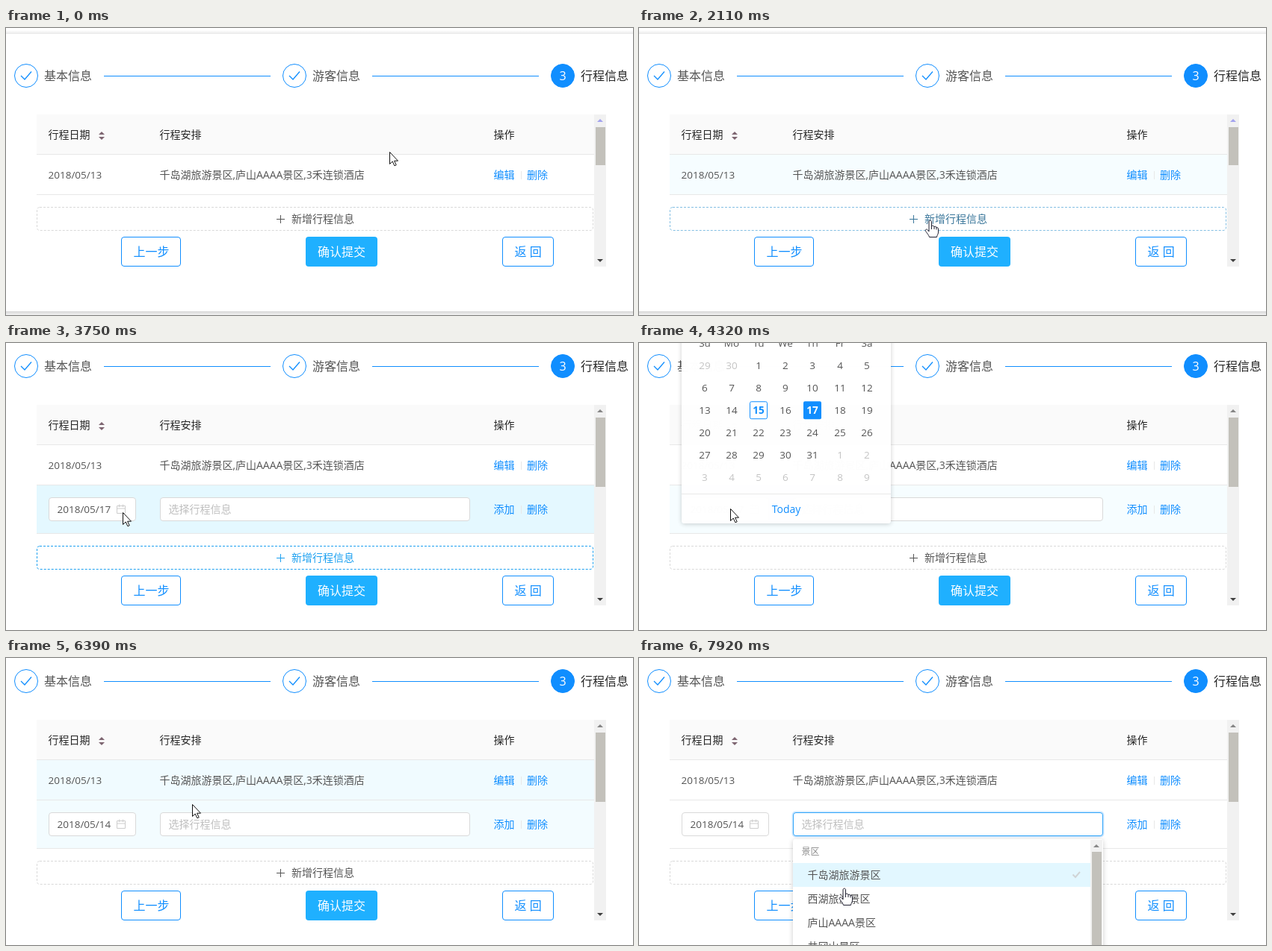
Write an HTML page that moves like this. It is 839x385 px and loops after 8000 ms.

```html
<!DOCTYPE html>
<html lang="zh-CN">
<head>
<meta charset="utf-8">
<title>行程信息</title>
<style>
html, body { margin: 0; width: 100%; height: 100%; overflow: hidden; background: #fff; }
svg { display: block; width: 839px; height: 385px; }
text { font-family: 'Open Sans', 'Noto Sans CJK SC', 'Noto Sans CJK', 'Noto Sans', sans-serif; white-space: pre; }
</style>
</head>
<body>
<svg id="stage" viewBox="0 0 839 385" xmlns="http://www.w3.org/2000/svg"></svg>
<script>
const LOOP = 8000, STEP = 110;
const ADDED = 2640, OPENED = 4100, PICKED = 5280, SELECTING = 7030;
const BLUE = '#108eff', GREY = '#d9d9d9', TEXT = '#555', DARK = '#262626', TINT = '#e4f8ff';

const rect = (x, y, w, h, fill, more = '') =>
  `<rect x="${x}" y="${y}" width="${w}" height="${h}" fill="${fill}" ${more}/>`;
const text = (x, y, s, fill = TEXT, size = 14, more = '') =>
  `<text x="${x}" y="${y}" style="fill:${fill};font-size:${size}px" ${more}>${s}</text>`;
const path = (d, fill, more = '') => `<path d="${d}" fill="${fill}" ${more}/>`;
const line = (d, color, more = '') => path(d, 'none', `stroke="${color}" ${more}`);
const rule = (y, x = 41, w = 746) => line(`M${x} ${y}.5h${w}`, '#e8e8e8');
const group = (id, body) => `<g id="${id}">${body}</g>`;
const box = (x, y, w, h, color, more = '') =>
  rect(x + .5, y + .5, w - 1, h - 1, '#fff', `rx="3.5" stroke="${color}" ${more}`);
const arrowUp = (x, y, fill, more) => path(`M${x - 4} ${y + 2}l4 -4l4 4z`, fill, more);
const arrowDown = (x, y, fill, more) => path(`M${x - 4} ${y - 2}l4 4l4 -4z`, fill, more);
const middle = 'text-anchor="middle"';

function steps() {
  return ['基本信息', '游客信息', '行程信息'].map((name, i) => {
    const x = 27 + 359 * i, last = i === 2;
    return `<circle cx="${x}" cy="64" r="15.5" fill="${last ? BLUE : '#fff'}" stroke="${BLUE}"/>` +
      (last ? text(x, 69.5, '3', '#fff', 16, middle)
            : line(`M${x - 7} 64l5 5l9 -10.5`, BLUE, 'stroke-width="1.3"') + line(`M${x + 104} 64.5h223`, BLUE)) +
      text(x + 24, 70, name, last ? DARK : TEXT, 16);
  }).join('');
}

function actions(y, first) {
  return text(652.5, y, first, BLUE) + line(`M689.5 ${y - 10}v11`, '#e8e8e8') + text(697, y, '删除', BLUE);
}

function table() {
  return rect(41, 116, 746, 53, '#fafafa') + rule(169) +
    text(56.5, 148, '行程日期', DARK) + text(205.5, 148, '行程安排', DARK) + text(652.5, 148, '操作', DARK) +
    arrowUp(128, 141, '#7d6570') + arrowDown(128, 148, '#7d6570') +
    rect(41, 170, 746, 53, TINT, 'id="hover1"') + rule(223) +
    text(56.5, 202, '2018/05/13', TEXT, 13.5) +
    text(205.5, 202, '千岛湖旅游景区,庐山AAAA景区,3禾连锁酒店') + actions(202, '编辑');
}

function newRow() {
  return rect(41, 191, 746, 64, TINT, 'id="hover2"') + rule(255) +
    box(57, 207, 117, 32, GREY) + text(68.5, 228, '', TEXT, 13.5, 'id="date"') +
    line('M148.5 218.5h11v10h-11zM148.5 222h11M151.5 216.5v3.5M156.5 216.5v3.5', '#ccc') +
    rect(204.5, 205.5, 418, 35, BLUE, 'rx="5" id="glow"') +
    box(206, 207, 415, 32, GREY, 'id="select"') +
    text(217.5, 228, '选择行程信息', '#bfbfbf') + actions(228, '添加');
}

function footer() {
  return box(41, 240, 745, 32, GREY, 'id="addBox" stroke-dasharray="3 2"') +
    group('addText', line('M362 256.5h11M367.5 251v11', 'currentColor') +
      text(382, 261, '新增行程信息', 'currentColor')) +
    box(154, 280, 80, 40, BLUE) + text(170.5, 306, '上一步', BLUE, 16) +
    rect(401, 280, 96, 40, '#1fb0ff', 'rx="4"') + text(417, 306, '确认提交', '#fff', 16) +
    box(664, 280, 69, 40, BLUE) + text(680.5, 306, '返 回', BLUE, 16);
}

function calendar() {
  const colX = c => Math.round(88 + 36.1 * c);
  let s = rect(57, -110, 280, 352, '#fff', 'rx="4" filter="url(#shadow)"') +
    rule(202, 57, 280) + text(197, 227.5, 'Today', BLUE, 14, middle);
  'Su Mo Tu We Th Fr Sa'.split(' ').forEach((d, c) => s += text(colX(c), 5, d, TEXT, 13.5, middle));
  for (let i = 0; i < 42; i++) {
    const n = i - 1, x = colX(i % 7), y = 30 + 30 * Math.floor(i / 7);
    const inside = n > 0 && n < 32, today = n === 15;
    const day = n < 1 ? n + 30 : n > 31 ? n - 31 : n;
    s += rect(x - 12, y - 12, 24, 24, 'none', `rx="2" id="cell${n}"`);
    if (today) s += rect(x - 11.5, y - 11.5, 23, 23, '#fff', `rx="2" stroke="${BLUE}"`);
    s += text(x, y + 4.5, day, today ? BLUE : inside ? TEXT : '#c4c4c4', 13.5,
      `${middle} id="day${n}"` + (today ? ' font-weight="700"' : ''));
  }
  return s;
}

function dropdown() {
  return rect(206, 243, 415, 260, '#fff', 'rx="4" filter="url(#shadow)"') +
    text(217.5, 263.5, '景区', '#8c8c8c', 12) + rect(206, 275, 398, 32, '#e2f7ff') +
    ['千岛湖旅游景区', '西湖旅游景区', '庐山AAAA景区', '井冈山景区']
      .map((s, i) => text(225.5, 296 + 32 * i, s)).join('') +
    line('M580.5 290.5l3.5 3.5l6 -7', '#d0d4d6', 'stroke-width="2"') +
    rect(604, 244, 16, 160, '#f1f1f1') + rect(606, 260, 13, 150, '#c3c1bb') + arrowUp(612, 252, '#888');
}

function scrollbar() {
  return rect(787, 0, 16, 0, '#f1f1f1', 'id="track"') + rect(789, 0, 13, 0, '#c3c1bb', 'id="thumb"') +
    arrowUp(795, 8, '#a3a3ee', 'id="up"') + arrowDown(795, -8, '#404040', 'id="down"');
}

const fade = (id, from, to) => `<linearGradient id="${id}" x2="0" y2="1">
  <stop offset="0" stop-color="${from}"/><stop offset="1" stop-color="${to}"/></linearGradient>`;

const stage = document.getElementById('stage');
stage.innerHTML = `<defs>${fade('above', '#fff', '#e9e9e9')}${fade('below', '#d6d6d6', '#f3f3f3')}
  <filter id="shadow" x="-10%" y="-10%" width="120%" height="120%">
    <feDropShadow dx="0" dy="1" stdDeviation="3" flood-opacity=".2"/></filter></defs>` +
  group('page', rect(0, 3, 839, 5, 'url(#above)') + rect(0, 380, 839, 5, 'url(#below)')) +
  group('upper', steps() + table()) + group('row2', newRow()) + group('lower', footer()) +
  scrollbar() + group('cal', calendar()) + group('drop', dropdown()) +
  path('M.5 .5V16.5L4.2 13L6.9 18.8L9.2 17.8L6.6 12.2H11.5Z', '#fff', 'id="arrow" stroke="#111"') +
  path('M-2 2C-2 -.5 1.5 -.5 1.5 2V8C2 6.5 5 6.8 5 9C6 7.5 8 8 8 10C9 9 10.5 9.5 10.5 12V16C10.5 19 8.5 20 8.5 22.5' +
    'H-1.5C-2 20 -4.5 17.5 -6.5 14.5C-7.5 12.5 -5 11 -3.5 13L-2 15ZM1.5 8V12M5 9V12M8 10V12.5',
    '#fff', 'id="hand" stroke="#223" stroke-linejoin="round"');

const el = {};
stage.querySelectorAll('[id]').forEach(n => el[n.id] = n);
const set = (id, attrs) => { for (const k in attrs) el[id].setAttribute(k, attrs[k]); };
const show = (id, on) => set(id, { visibility: on ? 'visible' : 'hidden' });

const ease = k => { k = Math.max(0, Math.min(1, k)); return k * k * (3 - 2 * k); };
const mix = (a, b, k) => `rgb(${a.map((v, i) => Math.round(v + (b[i] - v) * k))})`;

// pointer legs: start, end, then where it comes to rest
const legs = [
  [0, 220, 498, 180], [600, 1310, 212, 309], [1320, 1430, 203, 249], [1430, 1750, 300, 196],
  [1750, 2090, 390, 258], [2970, 3960, 122, 222], [4350, 5060, 124, 92], [5500, 6380, 249, 196],
  [6380, 6930, 280, 222], [7250, 7810, 275, 287], [7810, 7920, 275, 309]
];

function pointer(t) {
  let x = 513, y = 166;
  for (const [from, to, toX, toY] of legs) {
    const k = ease((t - from) / (to - from));
    x += (toX - x) * k;
    y += (toY - y) * k;
  }
  return { x: Math.round(x), y: Math.round(y), t };
}

const covered = p => (p.t > OPENED && p.t < PICKED + 200) || (p.t > SELECTING && p.y >= 243);
const within = (a, b) => p => p.y >= a && p.y < b && !covered(p);
const onRow1 = p => p.t < ADDED ? within(170, 223)(p) : within(137, 190)(p);
const onRow2 = p => p.t >= ADDED && within(191, 255)(p);
const onAdd = p => p.t < ADDED ? within(240, 272)(p) : p.t < OPENED - 300;
const onHand = p => p.t < ADDED ? p.y >= 240 : covered(p) && p.y < 192 || p.t > SELECTING && covered(p);

// share of the last 300 ms spent over an area, like a linear hover transition
function hover(test, t) {
  const N = 20;
  let sum = 0;
  for (let i = 0; i < N; i++) sum += test(pointer(t - 300 * i / N));
  return sum / N;
}

// unfold a popup vertically from a fixed edge
function popup(id, open, edge) {
  const k = .8 + .2 * open;
  show(id, open > 0);
  set(id, { opacity: open, transform: `translate(0 ${edge * (1 - k)}) scale(1 ${k})` });
}

function draw(now) {
  const t = Math.floor(now / STEP) * STEP, added = t >= ADDED, picked = t >= PICKED;
  const top = added ? 83 : 116, bottom = added ? 352 : 320;

  show('page', !added);
  show('row2', added);
  set('upper', { transform: `translate(0 ${top - 116})` });
  set('lower', { transform: `translate(0 ${bottom - 320})` });
  set('track', { y: top, height: bottom - top });
  set('thumb', { y: top + 17, height: added ? 93 : 51 });
  set('up', { transform: `translate(0 ${top})`, fill: added ? '#858585' : '#a3a3ee' });
  set('down', { transform: `translate(0 ${bottom})` });

  set('hover1', { opacity: hover(onRow1, t) });
  set('hover2', { opacity: hover(onRow2, t) });
  const hot = hover(onAdd, t), grey = [217, 217, 217], sky = [28, 160, 240];
  set('addBox', { stroke: mix(grey, sky, hot) });
  el.addText.style.color = mix([85, 85, 85], sky, hot);

  const chosen = picked ? 14 : 17;
  el.date.textContent = '2018/05/' + chosen;
  for (const n of [14, 17]) {
    const on = n === chosen;
    set('cell' + n, { fill: on ? BLUE : 'none' });
    set('day' + n, { 'font-weight': on ? 700 : 400 });
    el['day' + n].style.fill = on ? '#fff' : TEXT;
  }
  popup('cal', ease((t - OPENED) / 200) * ease((PICKED + 200 - t) / 200), 242);

  const drop = ease((t - SELECTING) / 200);
  popup('drop', drop, 243);
  set('glow', { opacity: drop * .2 });
  set('select', { stroke: mix(grey, [48, 165, 250], drop) });

  const p = pointer(t), hand = onHand(p);
  show('hand', hand);
  show('arrow', !hand);
  set(hand ? 'hand' : 'arrow', { transform: `translate(${p.x} ${p.y})` });
}

function tick() {
  draw(performance.now() % LOOP);
  requestAnimationFrame(tick);
}
tick();
</script>
</body>
</html>
```
